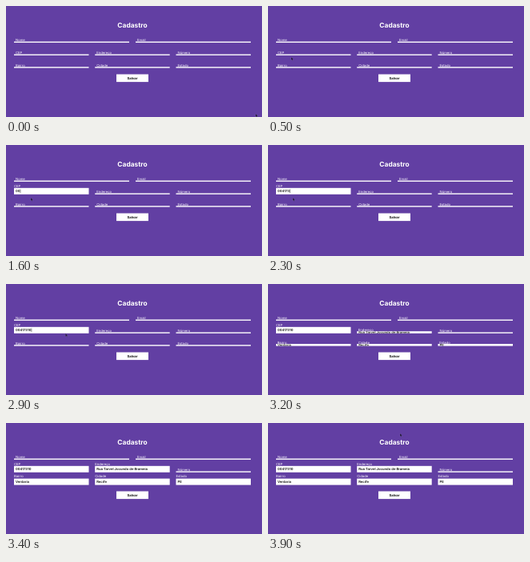
These frames come from a looping animation (320x139 px, 4000 ms). An HTML page:

```html
<!DOCTYPE html>
<html lang="pt-BR">
<head>
<meta charset="utf-8">
<title>Cadastro</title>
<style>
  html, body { margin: 0; width: 100%; height: 100%; overflow: hidden; background: #623fa3; }
  svg { display: block; width: 320px; height: 139px; }
  text { font: 400 4.2px Inter, "Open Sans", sans-serif; fill: #fff; text-rendering: geometricPrecision; }
  .title { font-size: 8.4px; font-weight: 700; }
  .value { font-weight: 600; fill: #111; }
  .save { font-weight: 700; fill: #111; }
</style>
</head>
<body>
<svg id="stage" viewBox="0 0 320 139">
  <rect width="320" height="139" fill="#623fa3"/>
  <text class="title" x="158" y="26.8" text-anchor="middle">Cadastro</text>
  <g id="fields"></g>
  <rect x="138" y="85.5" width="40" height="9.6" fill="#fff"/>
  <text class="save" x="158" y="91.8" text-anchor="middle">Salvar</text>
  <rect id="caret" width=".5" height="4.6" fill="#222"/>
  <path id="pointer" d="M0 0V4L1 3.1 1.7 4.6 2.4 4.3 1.7 2.8H3Z" fill="#1c1230" stroke="#8a70bd" stroke-width=".25"/>
</svg>
<script>
const LOOP = 4000;
const LINE = 1.4, OPEN = 8;
const CEP = "00417310";
const CEP_OPEN = [790, 210], FILL_OPEN = [3130, 260];
const KEY_TIMES = [1500, 1600, 1700, 1800, 1900, 2300, 2400, 2600];

// Pointer stops: time, x, y
const STOPS = [
  [50, 312, 135], [500, 29, 64], [600, 23, 60], [720, 23, 60],
  [950, 29, 60], [1200, 31, 66], [2750, 31, 66], [3100, 140, 56],
  [3450, 150, 50], [3880, 165, 13]
];

const clamp = v => Math.min(1, Math.max(0, v));
const smooth = v => v * v * (3 - 2 * v);
const progress = (t, [start, length]) => smooth(clamp((t - start) / length));
const byId = id => document.getElementById(id);

function add(parent, tag, attrs, content = "") {
  const node = document.createElementNS("http://www.w3.org/2000/svg", tag);
  set(node, attrs);
  node.textContent = content;
  return parent.appendChild(node);
}

function set(node, attrs) {
  for (const key in attrs) node.setAttribute(key, attrs[key]);
}

function makeField(label, x, bottom, width, value, opening) {
  const group = byId("fields");
  const id = "clip-" + label;
  const box = add(group, "rect", { x, width, fill: "#fff" });
  const clip = add(add(group, "clipPath", { id }), "rect", { x, width });
  const holder = add(group, "g", { "clip-path": `url(#${id})` });
  const text = add(holder, "text", { class: "value", x: x + 2 }, value);
  const name = add(group, "text", {}, label);

  return {
    text,
    update(t) {
      const p = opening ? progress(t, opening) : 0;
      const height = LINE + (OPEN - LINE) * p;
      const frame = { y: bottom - height, height };
      set(box, frame);
      set(clip, frame);
      set(text, { y: bottom - height / 2 + 1.5, visibility: p > 0 ? "visible" : "hidden" });
      set(name, { x: x + 2 * (1 - p), y: bottom - 1.6 - 7.6 * p });
    }
  };
}

const ROWS = [45.9, 61.8, 77.6], COLS = [10, 111.2, 212.5], THIRD = 93.5;
const cep = makeField("CEP", COLS[0], ROWS[1], THIRD, "", CEP_OPEN);
const fields = [
  makeField("Nome", 10, ROWS[0], 144, ""),
  makeField("Email", 162, ROWS[0], 144, ""),
  cep,
  makeField("Endereço", COLS[1], ROWS[1], THIRD, "Rua Tarvel Jocundo de Brameia", FILL_OPEN),
  makeField("Número", COLS[2], ROWS[1], THIRD, ""),
  makeField("Bairro", COLS[0], ROWS[2], THIRD, "Ventaria", FILL_OPEN),
  makeField("Cidade", COLS[1], ROWS[2], THIRD, "Recife", FILL_OPEN),
  makeField("Estado", COLS[2], ROWS[2], THIRD, "PE", FILL_OPEN)
];

function pointerAt(t) {
  const next = STOPS.findIndex(stop => stop[0] > t);
  if (next === 0) return STOPS[0].slice(1);
  if (next < 0) return STOPS[STOPS.length - 1].slice(1);
  const [t0, x0, y0] = STOPS[next - 1], [t1, x1, y1] = STOPS[next];
  const p = smooth((t - t0) / (t1 - t0));
  return [x0 + (x1 - x0) * p, y0 + (y1 - y0) * p];
}

function render(t) {
  fields.forEach(field => field.update(t));

  const typed = KEY_TIMES.filter(time => t >= time).length;
  cep.text.textContent = CEP.slice(0, typed);
  set(byId("caret"), {
    x: 12 + (typed ? cep.text.getComputedTextLength() + 0.2 : 0),
    y: 55.4,
    visibility: t > 950 && t < 3000 ? "visible" : "hidden"
  });

  set(byId("pointer"), {
    transform: `translate(${pointerAt(t).join(" ")})`,
    visibility: t < 3100 || t >= 3500 ? "visible" : "hidden"
  });
}

const start = performance.now();
function tick() {
  render((performance.now() - start) % LOOP);
  requestAnimationFrame(tick);
}
tick();
</script>
</body>
</html>
```
